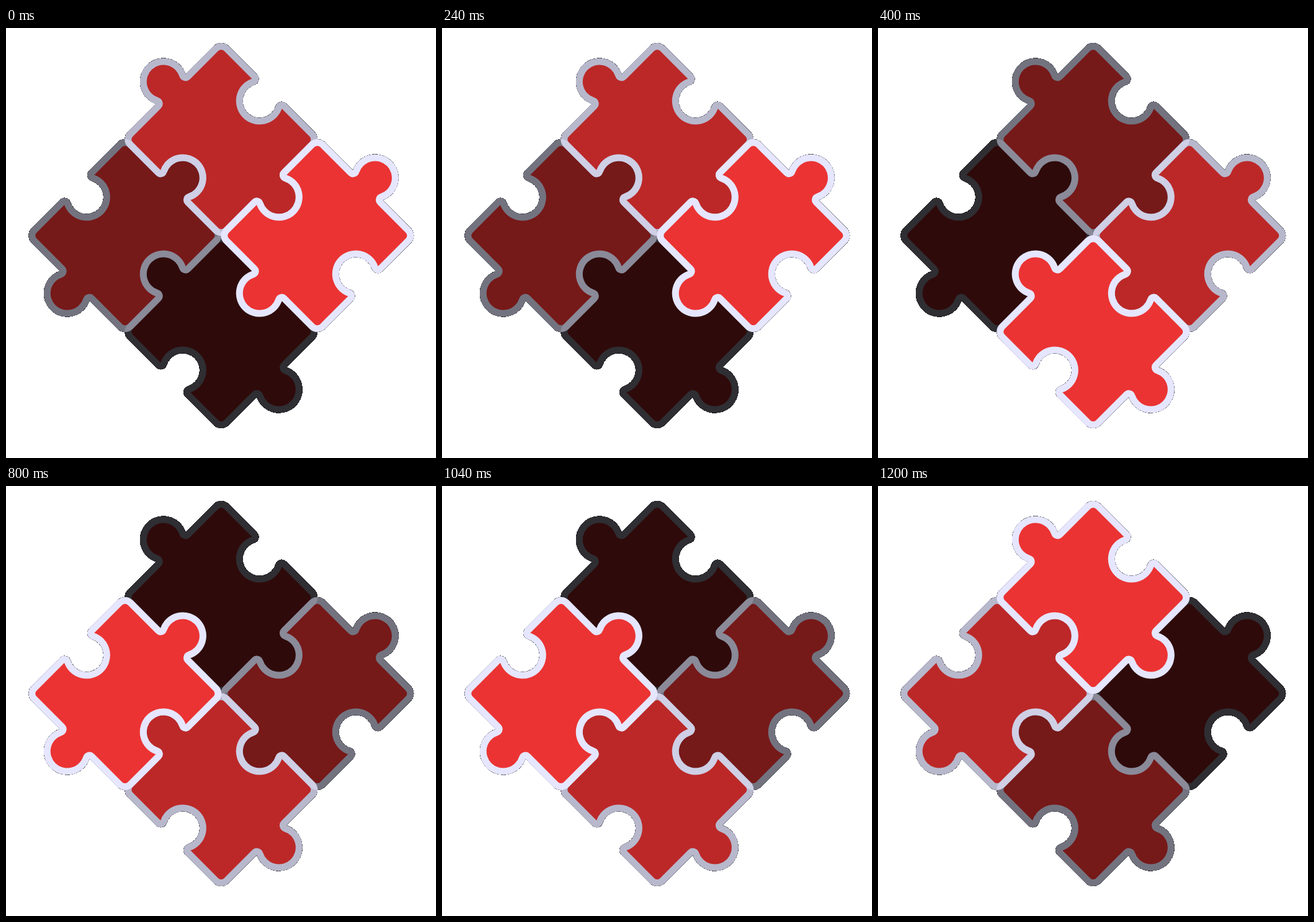
An HTML page for the animation above (1.6 s loop, 693 px wide and 693 px high).

```html
<!DOCTYPE html>
<html lang="en">
<head>
<meta charset="utf-8">
<title>Puzzle loader</title>
<style>
  html, body { margin: 0; width: 100%; height: 100%; overflow: hidden; background: #fff; }
  svg { display: block; width: 100%; height: 100%; }
  .piece { fill: #eb3333; stroke: #e6e6ff; stroke-width: 11; }
  .shadow { fill: #000; stroke: #000; stroke-width: 11.4; shape-rendering: crispEdges; }
</style>
</head>
<body>
<svg id="stage" viewBox="0 0 693 693"></svg>
<script>
const STEP = 400;
const CENTER = { x: 346.8, y: 334.5 };
const PITCH = 155;
const LEVELS = [1, 0.8, 0.5, 0.2];

const stage = document.getElementById('stage');

// One piece as an upright square: knobs and sockets alternate.
function piecePath() {
  const half = PITCH / Math.SQRT2;
  const corner = 12, knob = 32.5, lip = 5, rise = 22;
  const neck = Math.sqrt((knob + lip) ** 2 - (rise - lip) ** 2);
  const q = lip / (knob + lip);
  const joinX = neck * (1 - q);
  const joinY = lip + (rise - lip) * q;
  let d = '';

  for (let side = 0; side < 4; side++) {
    const out = side % 2 ? 1 : -1;
    const turn = side * Math.PI / 2;
    const c = Math.cos(turn), s = Math.sin(turn);
    const at = (along, up) => {
      const y = -half - up;
      return `${(along * c - y * s).toFixed(3)} ${(along * s + y * c).toFixed(3)}`;
    };
    const arc = (r, large, sweep, p) => `A${r} ${r} 0 ${large} ${sweep} ${p}`;
    const bulge = out > 0 ? 1 : 0;

    d += (side ? 'L' : 'M') + at(corner - half, 0)
      + 'L' + at(-neck, 0)
      + arc(lip, 0, 1 - bulge, at(-joinX, out * joinY))
      + arc(knob, 1, bulge, at(joinX, out * joinY))
      + arc(lip, 0, 1 - bulge, at(neck, 0))
      + 'L' + at(half - corner, 0)
      + arc(corner, 0, 1, at(half, -corner));
  }
  return d + 'Z';
}

const shape = piecePath();

function addPiece(className) {
  const path = document.createElementNS('http://www.w3.org/2000/svg', 'path');
  path.setAttribute('class', className);
  path.setAttribute('d', shape);
  stage.append(path);
  return path;
}

// Slots run clockwise: top, right, bottom, left.
function place(path, slot) {
  const a = (slot - 1) * Math.PI / 2;
  const x = CENTER.x + PITCH * Math.cos(a);
  const y = CENTER.y + PITCH * Math.sin(a);
  path.setAttribute('transform', `translate(${x} ${y}) rotate(${45 + slot * 90})`);
}

for (let slot = 0; slot < 4; slot++) place(addPiece('shadow'), slot);

// Dimmest first, so the brightest piece lies on top.
const layers = [3, 2, 1, 0].map(level => {
  const path = addPiece('piece');
  path.setAttribute('opacity', LEVELS[level]);
  return { path, level };
});

function render(time) {
  const step = Math.floor(time / STEP) % 4;
  for (const { path, level } of layers) place(path, (step + 5 - level) % 4);
}

function tick(now) {
  render(now);
  requestAnimationFrame(tick);
}

render(0);
requestAnimationFrame(tick);
</script>
</body>
</html>
```
